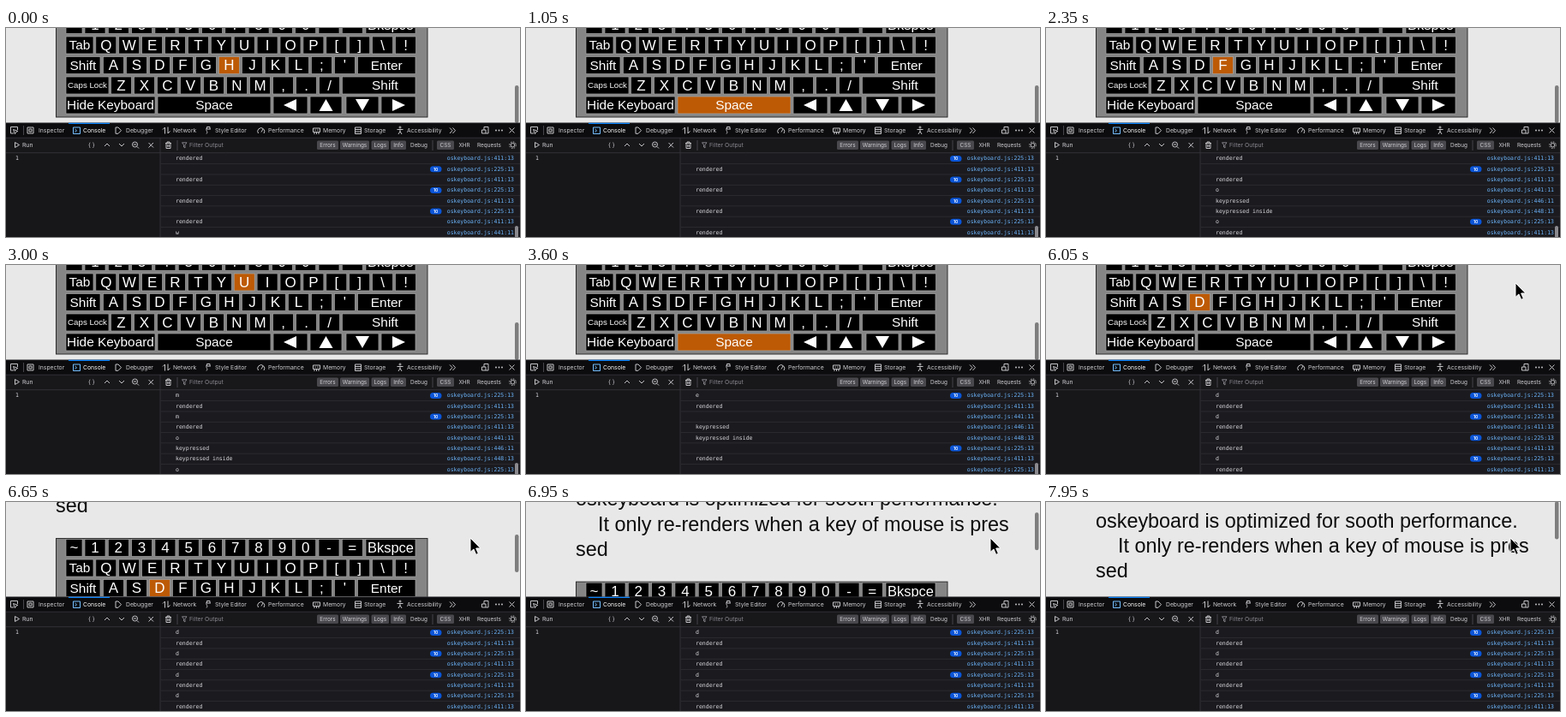
Animation of 600x244 px, one loop 8 s. Source, as an HTML page:

```html
<!DOCTYPE html>
<html lang="en">
<head>
<meta charset="utf-8">
<title>On-screen keyboard</title>
<style>
  html, body { margin: 0; width: 100%; height: 100%; overflow: hidden; background: #e8e8e8; }
  svg { display: block; width: 600px; height: 244px; }
  text { white-space: pre; }
  .page { font: 23.4px "Liberation Sans", Arial, sans-serif; fill: #0c0c0c; }
  .key text { font: 15.4px "Liberation Sans", Arial, sans-serif; fill: #fff; text-anchor: middle; }
  .key rect { fill: #000; stroke: #a4a4a4; stroke-width: .7; }
  .key polygon { fill: #fff; }
  .key.on rect { fill: #bd5a05; }
  .ui { font: 6.8px Inter, Roboto, sans-serif; fill: #d0d0d4; }
  .log { font: 6.5px "DejaVu Sans Mono", monospace; fill: #d9d9dd; }
  .log .link { fill: #6cb4fb; text-anchor: end; }
  .log .count { font: 600 5px Inter, sans-serif; fill: #fff; text-anchor: middle; }
  .icon { fill: none; stroke: #c4c4c8; stroke-width: 1; }
</style>
</head>
<body>
<svg id="stage" viewBox="0 0 600 244" xmlns="http://www.w3.org/2000/svg">
  <rect width="600" height="112" fill="#e8e8e8"/>
  <g id="content">
    <g class="page">
      <text x="58" y="-103.3">oskeyboard is optimized for sooth performance.</text>
      <text x="58" y="-74">    It only re-renders when a key of mouse is pres</text>
      <text x="58" y="-44.7">sed</text>
    </g>
    <rect x="58.5" y="-14.5" width="433.5" height="118.5" fill="#858585" stroke="#2c2c2c"/>
    <g id="keys"></g>
  </g>
  <rect id="pageThumb" x="594" y="67" width="4.5" height="44" rx="2.2" fill="#7d7d7d"/>
  <path id="pointer" d="M0 0V16.5L3.9 13L6.7 19.4L9.4 18.2L6.7 12H11.8Z" fill="#000" stroke="#fff" stroke-width="1"/>

  <g id="tools">
    <rect y="111" width="600" height="133" fill="#1b1b1f"/>
    <rect y="111" width="600" height="17" fill="#0c0c0e"/>
    <rect y="128" width="600" height="17.5" fill="#18181b"/>
    <rect y="146" width="180" height="98" fill="#17171a"/>
    <path d="M0 110.8H600M0 128.2H600M0 145.7H600M180 128V244" stroke="#38383d" stroke-width=".8"/>
    <rect x="73" y="110.8" width="48" height="1.2" fill="#0a84ff"/>
    <g class="icon">
      <path d="M9 123H5.5V115.5H13.5V119M8.5 118.5L14 120.5L11.5 121.3L10.5 123.8Z"/>
      <path d="M20.5 114V125" stroke="#44444a"/>
      <path d="M25 116H32V123H25ZM27 118H30V121H27Z"/>
      <path d="M78.5 116H86.5V123.5H78.5ZM80.5 118L82.5 119.8L80.5 121.6" stroke="#75bfff"/>
      <path d="M128 116H131L134.5 119.7L131 123.3H128Z"/>
      <path d="M185.5 123.5V116L183 118.5M189 115.5V123L191.5 120.5"/>
      <path d="M234.5 118V115.5H238V118M233 118H239M234 119C234 121 236 121 234 123.5"/>
      <path d="M294.5 123A4 4 0 1 1 301 123M298 121.5L300 118"/>
      <path d="M358.5 117H366.5V121.5H358.5ZM360 121.5V124M362.5 121.5V124M365 121.5V124M361 118.5V120M364 118.5V120"/>
      <path d="M407.5 116H414.5V123.5H407.5ZM407.5 118.5H414.5M407.5 121H414.5"/>
      <circle cx="460" cy="116" r="1"/><path d="M456.5 118.5H463.5M460 118.5V120.5L458 124M460 120.5L462 124"/>
      <path d="M518 116.5L521 119.7L518 123M521.5 116.5L524.5 119.7L521.5 123"/>
      <path d="M558 115.5H563V123H555.5V119H558ZM558 119H560V123"/>
      <path d="M587.5 116.5L593.5 122.5M593.5 116.5L587.5 122.5"/>
      <path d="M10.5 133.5V139.5L15.5 136.5Z"/>
      <path d="M115 138L118 135L121 138M132 135L135 138L138 135"/>
      <circle cx="150.5" cy="136" r="3"/><path d="M153 138.5L155 140.5M149 136H152"/>
      <path d="M166.5 134L172 139.5M172 134L166.5 139.5"/>
      <path d="M186 134.5H193M188 134V133H191V134M187 135V140.5H192V135M188.8 136V139M190.3 136V139"/>
      <path d="M200 131V143M498 131V143" stroke="#44444a"/>
      <path d="M205.5 133.8H211L209 136.5V140L207.5 139V136.5Z" stroke="#9a9aa0" stroke-width=".8"/>
      <circle cx="591.5" cy="136.7" r="2.3"/>
      <circle cx="591.5" cy="136.7" r="3.8" stroke-dasharray="1.5 1.48"/>
    </g>
    <g fill="#d0d0d4"><circle cx="572" cy="119.5" r=".9"/><circle cx="575.5" cy="119.5" r=".9"/><circle cx="579" cy="119.5" r=".9"/></g>
    <g class="ui" id="labels"></g>
    <text class="log" x="11" y="154.3">1</text>
  </g>
  <g class="log" id="log"></g>
  <rect id="logThumb" x="594" y="231" width="4" height="14" rx="2" fill="#8b8b8f"/>
</svg>
<script>
const LOOP = 8000, LOG_LAG = 150, RENDERS = 5, ROWS = 8, ROW_HEIGHT = 12.3;
const byId = id => document.getElementById(id);

function add(parent, tag, attrs, text) {
  const node = document.createElementNS(parent.namespaceURI, tag);
  for (const name in attrs) node.setAttribute(name, attrs[name]);
  if (text !== undefined) node.textContent = text;
  return parent.appendChild(node);
}

// Keyboard
const keys = {};
const ARROWS = {
  left: '-8,0 7,-7 7,7', up: '0,-7 8,7 -8,7',
  down: '0,7 8,-7 -8,-7', right: '8,0 -7,-7 -7,7'
};

function addKey(label, x, y, width, size = 15.4, cx = x + width / 2) {
  const group = add(byId('keys'), 'g', { class: 'key' });
  add(group, 'rect', { x, y, width, height: 20 });
  if (ARROWS[label]) {
    add(group, 'polygon', { points: ARROWS[label], transform: `translate(${cx} ${y + 10})` });
  } else {
    add(group, 'text', { x: cx, y: y + 10 + size * .34, style: `font-size:${size}px` }, label);
  }
  keys[label] = group;
}

function addLetters(letters, x, y, pitch) {
  [...letters].forEach((c, i) => addKey(c, x + i * pitch, y, 24, 17));
}

addKey('~', 70, -13.5, 19, 17);
addLetters('1234567890-=', 92, -13.5, 27.3);
addKey('Bkspce', 420, -13.5, 58, 16.5);
addKey('Tab', 70, 10, 32);
addLetters('QWERTYUIOP[]\\!', 104.8, 10, 26.9);
addKey('Shift', 70, 33.5, 40);
addLetters("ASDFGHJKL;'", 113.4, 33.5, 27);
addKey('Enter', 410.5, 33.5, 67.5);
addKey('Caps Lock', 70, 57, 50, 9.7);
addLetters('ZXCVBNM,./', 122.5, 57, 27);
addKey('Shift', 392.5, 57, 85.5, 15.4, 442.5);
addKey('Hide Keyboard', 70, 80, 104);
addKey('Space', 177, 80, 132);
addKey('left', 312, 80, 40);
addKey('up', 355, 80, 37);
addKey('down', 397, 80, 38);
addKey('right', 438, 80, 40);

// Developer tools labels
const labels = byId('labels');
const label = (text, x, y, fill = '#d0d0d4') => add(labels, 'text', { x, y, fill }, text);
const TABS = { Inspector: 38, Console: 90, Debugger: 140, Network: 195, 'Style Editor': 244,
  Performance: 306, Memory: 370, Storage: 418, Accessibility: 468 };
for (const name in TABS) label(name, TABS[name], 122, name === 'Console' ? '#fff' : undefined);
label('Run', 19, 139);
label('{ }', 96, 139);
label('Filter Output', 214, 139, '#88888e');
for (const [name, x, width, active] of [['Errors', 363, 25, 1], ['Warnings', 390, 34, 1],
  ['Logs', 426.5, 20.5, 1], ['Info', 449, 18, 1], ['Debug', 470, 24], ['CSS', 503, 20, 1],
  ['XHR', 525, 20], ['Requests', 547, 34]]) {
  if (active) add(labels, 'rect', { x, y: 131.5, width, height: 10.5, rx: 1.5, fill: '#48484d' });
  add(labels, 'text', { x: x + width / 2, y: 138.9, 'text-anchor': 'middle', style: 'font-size:6.4px' }, name);
}

// Typing: character and the time its key lights up
const strokes = [
  ['h', -30], ['e', 140], ['n', 280], [' ', 420], ['a', 560], [' ', 680],
  ['k', 1180], ['e', 1480], ['y', 1710], [' ', 1850], ['o', 2130], ['f', 2270], [' ', 2440],
  ['m', 2620], ['o', 2800], ['u', 2940], ['s', 3070], ['e', 3200], [' ', 3350],
  ['i', 3640], ['s', 3820], [' ', 4000], ['p', 4180], ['r', 4350], ['e', 4520],
  ['s', 4680], ['s', 4810], ['e', 4950], ['', 5095], ['d', 5125]
];
const presses = [[' ', -500], ['w', 0],
  ...strokes.filter(([c]) => c).map(([c, at]) => [c, at + LOG_LAG])];

// Each press logs three lines, then a few renders unless the next press comes first
const lines = [];
presses.forEach(([char, at], i) => {
  const end = i + 1 < presses.length ? presses[i + 1][1] : LOOP;
  const push = (delay, text, place, repeats) => lines.push({ at: at + delay, text, place, repeats });
  push(0, char, '441:11');
  push(15, 'keypressed', '446:11');
  push(30, 'keypressed inside', '448:13');
  for (let n = 0, delay = 45; n < RENDERS && at + delay + 20 < end; n++, delay += 50) {
    push(delay, char, '225:13', true);
    push(delay + 20, 'rendered', '411:13');
  }
});
const lastLog = lines[lines.length - 1].at;

const rows = Array.from({ length: ROWS }, (_, i) => {
  const y = 152.4 + i * ROW_HEIGHT, group = byId('log');
  add(group, 'rect', { x: 180.5, y: y + 5.9, width: 419.5, height: .7, fill: '#303036' });
  const text = add(group, 'text', { x: 198, y: y + 2 });
  const badge = add(group, 'g', {});
  add(badge, 'rect', { x: 495, y: y - 3.4, width: 13.5, height: 7, rx: 3.5, fill: '#0a55d8' });
  add(badge, 'text', { class: 'count', x: 501.7, y: y + 1.9 }, '10');
  const link = add(group, 'text', { class: 'link', x: 593, y: y + 2 });
  return { text, badge, link };
});

const clamp = v => Math.min(1, Math.max(0, v));
const mix = (a, b, k) => a + (b - a) * k;

function drawKeys(t) {
  const char = strokes.findLast(([, at]) => at <= t)[0];
  const lit = keys[char === ' ' ? 'Space' : char.toUpperCase()];
  for (const key of Object.values(keys)) key.classList.toggle('on', key === lit);
}

function drawLog(t) {
  const shown = lines.findLastIndex(line => line.at <= t) + 1;
  rows.forEach((row, i) => {
    const line = lines[shown - ROWS + i];
    row.text.textContent = line.text;
    row.link.textContent = 'oskeyboard.js:' + line.place;
    // The counter appears once the line has repeated
    row.badge.style.display = line.repeats && t - line.at > 8 ? '' : 'none';
  });
}

const SCROLL_START = 6450, SCROLL_TIME = 1180;

function drawPage(t) {
  const scroll = 133 * (1 - (1 - clamp((t - SCROLL_START) / SCROLL_TIME)) ** 3);
  byId('content').setAttribute('transform', `translate(0 ${scroll})`);
  byId('pageThumb').setAttribute('y', 67 - scroll * .508);

  // Idle scrollbars fade out
  const idle = 1 - clamp((t - lastLog - 150) / 200);
  byId('logThumb').style.opacity = idle;
  byId('pageThumb').style.opacity = t < SCROLL_START ? idle : 1;

  const enter = clamp((t - 5960) / 80), settle = clamp((t - 6060) / 300);
  const x = mix(mix(600, 548, enter), 542, settle);
  const y = mix(mix(10, 21, enter), 42, settle);
  byId('pointer').setAttribute('transform', `translate(${x} ${y})`);
  byId('pointer').style.display = t < 5960 ? 'none' : '';
}

const start = performance.now();
function frame() {
  const t = (performance.now() - start) % LOOP;
  drawKeys(t);
  drawLog(t);
  drawPage(t);
  requestAnimationFrame(frame);
}
frame();
</script>
</body>
</html>
```
